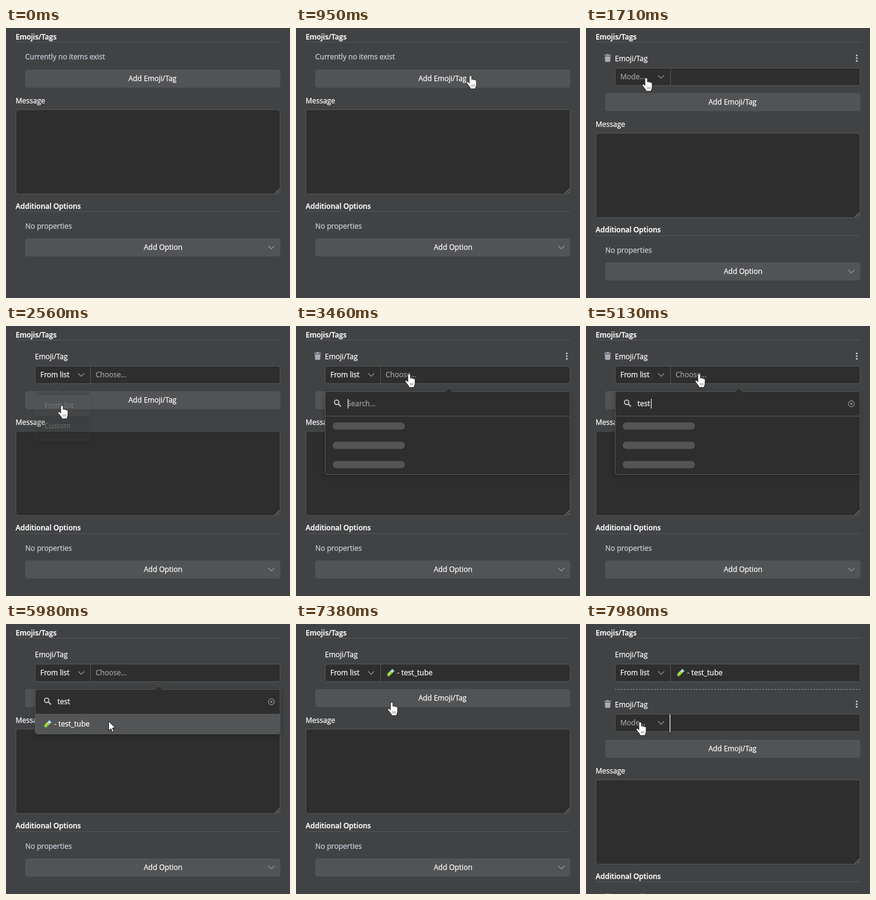
An HTML page for the animation above (8 s loop, 472x448 px).

```html
<!DOCTYPE html>
<html lang="en">
<head>
<meta charset="utf-8">
<title>Tag form</title>
<style>
html, body { margin: 0; width: 100%; height: 100%; overflow: hidden; background: #414244; }
#stage { position: relative; width: 472px; height: 448px; overflow: hidden; background: #414244;
  font: 400 12px/16px "Open Sans", sans-serif; color: #fff; cursor: default; }
#stage * { position: absolute; box-sizing: border-box; }
#stage svg * { position: static; }
span { white-space: pre; -webkit-text-stroke: .25px currentColor; }
.layer { left: 0; top: 0; width: 472px; height: 0; }
.b { font-weight: 600; }
.soft { color: #cdcdda; }
.dim { color: #a0a1a8; }
.rule { height: 1px; background: #545557; }
.btn { background: #525355; border-radius: 4px; }
.box { background: #2d2e2d; border: 1px solid #545557; border-radius: 4px; }
.pop { box-shadow: 0 2px 8px rgba(0,0,0,.25); }
.bar { background: #535456; border-radius: 6px; }
.caret { width: 1px; background: #fff; }
</style>
</head>
<body>
<div id="stage"></div>
<script>
const LOOP = 8000;
const stage = document.getElementById('stage');

const text = (x, base, s, cls = '', id = '') =>
  `<span id="${id}" class="${cls}" style="left:${x}px;top:${base - 12}px">${s}</span>`;
const rect = (x, y, w, h, cls, id = '') =>
  `<div id="${id}" class="${cls}" style="left:${x}px;top:${y}px;width:${w}px;height:${h}px"></div>`;
const svg = (x, y, w, h, body, id = '') =>
  `<svg id="${id}" style="left:${x}px;top:${y}px" width="${w}" height="${h}" fill="none">${body}</svg>`;
const layer = (id, body) => `<div class="layer" id="${id}">${body}</div>`;
const chevron = (x, y) => svg(x, y, 12, 8, '<path d="M1 1.5 6 6.5 11 1.5" stroke="#98999b" stroke-width="1.1"/>');
const tip = x => svg(x - 6, 102, 12, 7,
  '<path d="M0 6.5 6 .7 12 6.5V7H0Z" fill="#2d2e2d"/><path d="M0 6.5 6 .7 12 6.5" stroke="#545557"/>');

const tube = (x, y) => svg(x - 7, y - 7, 14, 14,
  `<g transform="rotate(45 7 7)"><rect x="4.6" y="1" width="4.8" height="12.6" rx="2.4" fill="#c9e6ee"/>
  <path d="M4.6 4.5h4.8v6.7a2.4 2.4 0 0 1-4.8 0Z" fill="#86d02c"/>
  <path d="M6 5.5v5" stroke="#d4f56c" stroke-width="1.1"/>
  <rect x="4" y="0" width="6" height="2" rx="1" fill="#8fbfe0"/></g>`);

const open = '<path d="M4.6 4v2M9.4 4v2" stroke="#fff" stroke-width="2.6" stroke-linecap="round"/><path d="M4.8 4.4v1.4M9.2 4.4v1.4" stroke="#47302c" stroke-width="1.5" stroke-linecap="round"/>';
const arcs = '<path d="M3 6Q4.4 3.6 5.8 6M8.2 6Q9.6 3.6 11 6" stroke="#5a3025"/>';
const squint = '<path d="M3 3.8 5.6 5.2 3 6.4M11 3.8 8.4 5.2 11 6.4" stroke="#5a3025"/>';
const grin = '<path d="M3 8h8a4 4 0 0 1-8 0Z" fill="#a32440"/><path d="M3.3 8h7.4v1.2H3.5Z" fill="#fff"/>';
const teeth = '<path d="M3 7.8h8a4 4 0 0 1-8 0Z" fill="#fff" stroke="#c9772c" stroke-width=".5"/>';
const drop = '<path d="M11.6 1.2q3 4 0 4.2-3-.2 0-4.2Z" fill="#4aa7f2"/>';
const tears = '<circle cx="2" cy="8" r="1.8" fill="#4aa7f2"/><circle cx="12" cy="6.5" r="1.8" fill="#4aa7f2"/>';
const face = (y, body, turn = 0) => svg(62, y - 7, 14, 14,
  `<g transform="rotate(${turn} 7 7)"><circle cx="7" cy="7" r="6.3" fill="url(#sun)"/>${body}</g>`);
const faces = [
  ['grinning', open + grin], ['smiley', open + grin], ['smile', arcs + grin], ['grin', arcs + teeth],
  ['laughing', squint + grin], ['sweat_smile', arcs + grin + drop], ['rofl', squint + grin + tears, -35]
];

const item = n => layer('item' + n,
  layer('tools' + n,
    svg(30, 43, 12, 14, '<path d="M.5 1.5h3.3l.7-1.2h3l.7 1.2h3.3v1.6H.5ZM1.2 4h9.6l-.6 8a1.3 1.3 0 0 1-1.3 1.2H3.1A1.3 1.3 0 0 1 1.8 12Z" fill="#a9aab4"/>') +
    svg(447, 43, 6, 14, '<g fill="#c3c4c8"><circle cx="3" cy="2.5" r="1.6"/><circle cx="3" cy="7" r="1.6"/><circle cx="3" cy="11.5" r="1.6"/></g>')) +
  text(48, 55, 'Emoji/Tag') +
  rect(48, 66, 408, 30, 'box') + rect(140, 66, 1, 30, 'rule') +
  text(57, 85, 'Mode...', 'dim', 'mode' + n) + chevron(119, 77));

const cursors = {
  hand: [-6, -1, '<path transform="scale(1.08 1.04)" d="M4.6 13V2.6a1.9 1.9 0 0 1 3.8 0V7.4c.3-1.1 2.7-1 2.8.5.3-1 2.4-.8 2.5.7.4-.9 2-.5 2 1V15c0 3-1.3 4-1.6 7H6.4C6.2 19 2.9 16.6.8 13c-.9-1.8 1.4-3 2.6-1.5Z" fill="#fff" stroke="#111" stroke-width=".8"/><path d="M9 15.5v4M11.2 15.5v4M13.4 15.5v4" stroke="#555" stroke-width=".7"/>'],
  arrow: [0, -1, '<path d="M.6 1.2v15.9l3.7-3.5 2.5 5.8 2.6-1.1-2.5-5.7h5Z" fill="#fff" stroke="#111"/>'],
  beam: [-4, -8, '<path d="M1 .6h2.5q.5 0 .5.6.1-.6.6-.6H7M4 1v14M1 15.4h2.5q.5 0 .5-.6.1.6.6.6H7" stroke="#fff"/>']
};

stage.innerHTML =
  '<svg width="0" height="0"><linearGradient id="sun" x2="0" y2="1"><stop stop-color="#ffc64a"/><stop offset="1" stop-color="#f4761f"/></linearGradient></svg>' +
  text(16, 19, 'Emojis/Tags', 'b') + rect(16, 23, 440, 1, 'rule') +
  text(32, 52, 'Currently no items exist', 'soft', 'empty') +
  item(1) +
  layer('choice', text(149, 85, 'Choose...', 'dim', 'choose') +
    layer('picked', tube(157, 81) + text(168, 85, '- test_tube'))) +
  layer('divider', '<div style="left:48px;top:108px;width:408px;border-top:1px dashed #8c8d8f"></div>') +
  item(2) + rect(139, 150, 1, 29, 'caret', 'focus') +
  layer('lower',
    rect(32, 69, 424, 30, 'btn') + text(203.5, 88, 'Add Emoji/Tag') +
    text(16, 125, 'Message') + rect(16, 135, 440, 141, 'box') +
    svg(446, 266, 10, 10, '<path d="M1 8.5 8.5 1M5 8.5 8.5 5" stroke="#b4b4b4"/>') +
    text(16, 300, 'Additional Options', 'b') + rect(16, 304.2, 440, 1, 'rule') +
    text(32, 333.2, 'No properties', 'soft') +
    rect(32, 349.2, 424, 30, 'btn') + text(229, 368.3, 'Add Option') + chevron(435, 360.4)) +
  layer('modes',
    rect(48, 108, 92, 82, 'box pop') + tip(94) +
    rect(49, 115, 90, 34, 'bar', 'modeHover') + text(64, 136, 'From list') + text(64, 170, 'Custom')) +
  layer('drop',
    rect(48, 108, 408, 139, 'box pop', 'panel') + tip(254) +
    svg(62, 121, 14, 14, '<circle cx="5.6" cy="5.6" r="3.7" stroke="#b9babd" stroke-width="1.9"/><path d="M8.5 8.5 12.6 12.6" stroke="#b9babd" stroke-width="2.2"/>') +
    text(85, 133, 'Search...', 'dim', 'hint') + text(85.5, 133, '', '', 'typed') +
    rect(86, 121, 1, 16, 'caret', 'caret') +
    svg(435, 123, 12, 12, '<circle cx="6" cy="6" r="5" stroke="#a9aaac"/><path d="M4 4 8 8M8 4 4 8" stroke="#a9aaac"/>', 'clear') +
    rect(49, 149, 406, 1, 'rule') +
    layer('wait', [0, 1, 2].map(i => rect(61, 160 + 32 * i, 120, 12, 'bar')).join('')) +
    layer('list', '<div style="left:49px;top:150px;width:394px;height:32px;background:#535456"></div>' +
      faces.map(([name, body, turn], i) => face(166 + 32 * i, body, turn) + text(80, 170 + 32 * i, '- ' + name)).join('') +
      svg(443, 149, 12, 18, '<rect x="1.5" y="1.5" width="9" height="15" rx="4.5" fill="#77787a" stroke="#fff" stroke-width="3"/>')) +
    layer('found', '<div style="left:49px;top:150px;width:406px;height:32px;background:#535456;border-radius:0 0 3px 3px"></div>' +
      tube(69, 166) + text(80, 170, '- test_tube'))) +
  Object.entries(cursors).map(([k, c]) => svg(0, 0, 18, 24, c[2], k)).join('');

const $ = {};
stage.querySelectorAll('[id]').forEach(e => $[e.id] = e);
$.modeHover.style.borderRadius = 0;
$.item2.style.top = '83px';

// time, x, y of the hotspot, pointer shape from then on
const path = [
  [450, 474, 75, 'arrow'], [500, 452, 74, 'hand'], [750, 289, 79, 'hand'], [1000, 289, 79, 'beam'],
  [1210, 289, 79, 'beam'], [1600, 138, 84, 'hand'], [1710, 99, 83, 'hand'], [2060, 97, 84, 'hand'],
  [2300, 92, 132, 'hand'], [2560, 92, 132, 'hand'], [2860, 168, 106, 'hand'], [3020, 187, 80, 'hand'],
  [5130, 187, 80, 'hand'], [5220, 185, 112, 'beam'], [5290, 182, 152, 'arrow'], [5430, 177, 214, 'arrow'],
  [5630, 170, 161, 'arrow'], [6380, 171, 161, 'hand'], [6680, 171, 161, 'arrow'], [6980, 163, 138, 'hand'],
  [7180, 158, 130, 'hand'], [7430, 158, 130, 'arrow'], [7480, 156, 131, 'arrow'], [7740, 122, 150, 'hand'],
  [7930, 89, 163, 'hand'], [8000, 89, 163, 'hand']
];
const keys = [4720, 4800, 4890, 4970];

const within = (t, a, b) => t >= a && t < b;
const ramp = (t, a, d) => Math.min(1, Math.max(0, (t - a) / d));
const show = (id, on) => $[id].style.visibility = on ? 'inherit' : 'hidden';
const fade = (id, v) => { $[id].style.opacity = v; show(id, v > 0); };

function pointer(t) {
  const i = path.findLastIndex(p => p[0] <= t);
  for (const k in cursors) show(k, i >= 0 && path[i][3] === k);
  if (i < 0) return;
  const [t0, x0, y0, shape] = path[i], [t1, x1, y1] = path[i + 1] || [LOOP, x0, y0];
  const k = ramp(t, t0, t1 - t0), [dx, dy] = cursors[shape];
  const x = Math.round(x0 + (x1 - x0) * k + dx), y = Math.round(y0 + (y1 - y0) * k + dy);
  $[shape].style.transform = `translate(${x}px,${y}px)`;
}

function draw(t) {
  const one = t >= 1000, two = t >= 7430, listed = t >= 2400;
  show('empty', !one);
  show('item1', one);
  show('tools1', within(t, 1210, 2150) || within(t, 2910, 5200));
  $.mode1.textContent = listed ? 'From list' : 'Mode...';
  $.mode1.className = listed ? '' : 'dim';
  show('choose', listed && t < 6680);
  show('picked', t >= 6680);
  show('divider', two);
  show('item2', two);
  show('tools2', t >= 7480);
  show('focus', t >= 7930);
  $.lower.style.top = (two ? 122.6 : one ? 39.4 : 0) + 'px';

  fade('modes', ramp(t, 1760, 200) - ramp(t, 2400, 200));
  show('modeHover', t >= 2180);

  fade('drop', ramp(t, 3210, 240) - ramp(t, 6680, 200));
  const list = within(t, 3720, 4770), found = t >= 5980;
  show('list', list);
  show('found', found);
  show('wait', !list && !found);
  $.panel.style.height = (list ? 268 : found ? 75 : 139) + 'px';
  const n = keys.filter(k => t >= k).length;
  $.typed.textContent = 'test'.slice(0, n);
  show('hint', !n);
  show('clear', n && t < 6380);
  show('caret', t < 5470 && !within(t, 4270, 4570));
  $.caret.style.left = [86, 90, 97, 103, 108][n] + 'px';
  pointer(t);
}

const start = performance.now();
(function tick() {
  draw((performance.now() - start) % LOOP);
  requestAnimationFrame(tick);
})();
</script>
</body>
</html>
```
